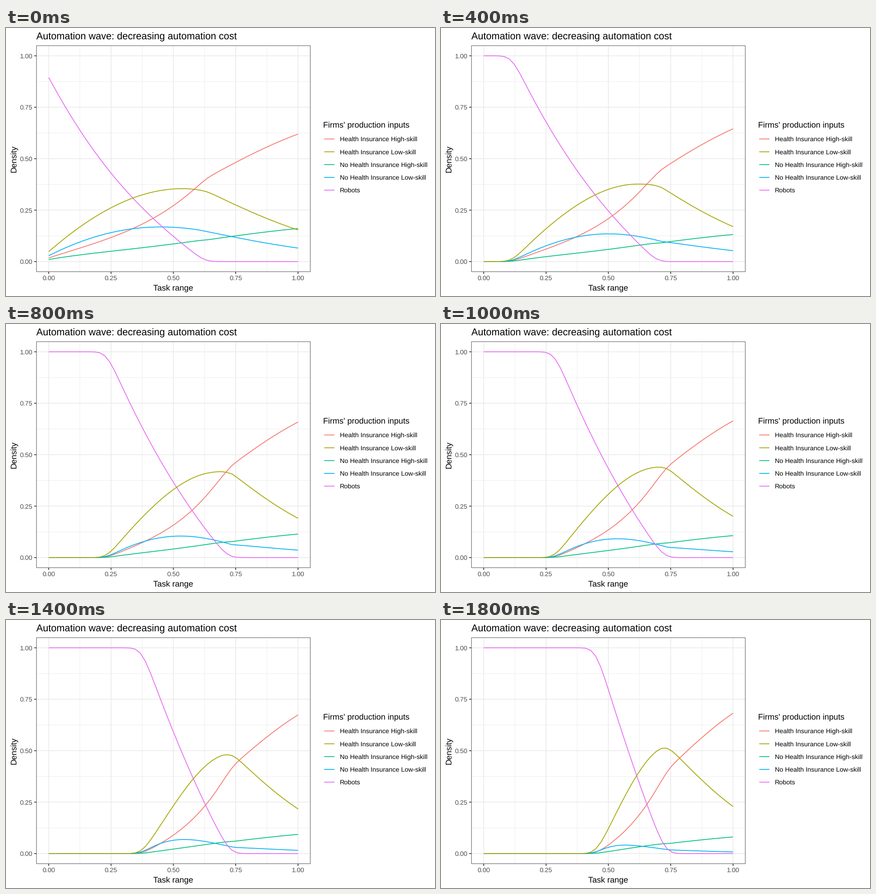
Write a matplotlib script that moves like this. It is 947 px wide and 592 px high and loops after 2000 ms.

```python
import numpy as np
import matplotlib.pyplot as plt
from matplotlib.animation import FuncAnimation
from matplotlib.patches import Rectangle

W, H = 947, 592
DPI = 100
FRAMES, INTERVAL = 10, 200
PT = 72 / DPI                 # one pixel in points
SMALL, MEDIUM, LARGE = 14.36, 17.95, 21.6
LINE = 1.74
LEFT, RIGHT, TOP, BOTTOM = 66.8, 672.2, 38.6, 538.7

plt.rcParams["font.family"] = "Liberation Sans"
plt.rcParams["text.hinting"] = "none"

SERIES = [
    ("Health Insurance High-skill", "#F8766D"),
    ("Health Insurance Low-skill", "#A3A500"),
    ("No Health Insurance High-skill", "#00BF7D"),
    ("No Health Insurance Low-skill", "#00B0F6"),
    ("Robots", "#E76BF3"),
]

tasks = np.linspace(0, 1, 50)
noise = np.linspace(-3, 3, 41)
weights = np.exp(-noise ** 2 / 2)
weights /= weights.sum()


def px(x):
    return 94.3 + 550.4 * np.asarray(x)


def py(y):
    return 516.0 - 454.6 * np.asarray(y)


def logistic(z):
    return 1 / (1 + np.exp(-z))


def robot_range(step):
    """Tasks where robots stop being the only input, and where they vanish."""
    first = -0.045 + 0.527 * np.log1p(step / 5.8)
    last = 0.732 - 0.105 * np.exp(-step / 1.85)
    return first, last


def robot_share(step, t):
    """Falls from 1 to 0 over the range, with both corners softened."""
    first, last = robot_range(step)
    u = (last - tasks[:, None] - 0.025 * noise) / (last - first)
    u = np.clip(u, 0, 1)
    linear = 0.625 + 0.18 * t
    return (linear * u + (1 - linear) * u ** (2.7 - 0.95 * t)) @ weights


def skilled_share(t):
    """High-skilled part of the workers."""
    bend_at = 0.595 + 0.14 * t ** 1.5
    bend = 3.0 + 7.4 * t - 5.0 * t ** 2
    slope = 3.34 + 2.1 * t - 0.35 * t ** 2
    odds = 1.27 - 0.1 * t - slope * (1 - tasks)
    return logistic(odds + bend * np.maximum(bend_at - tasks, 0) ** 2)


def insured_shares(t, edge):
    """Insured part of the high-skilled and of the low-skilled."""
    before = np.maximum(edge - tasks, 0)
    after = np.maximum(tasks - edge, 0) / (1 - edge)
    high = 0.794 + 0.1 * t ** 0.67 - (0.24 + 0.11 * t ** 2) * before

    fall = 0.8 + 7.2 * np.sin(np.pi * t / 2) ** 1.5
    drop = fall * before / (1 + 1.15 * (1 - t) ** 1.5 * fall * before)
    odds = 0.85 + 2.5 * t ** 1.38 + 0.8 * t * (1 - t) * (1 - after)
    return high, logistic(odds - drop)


def densities(step):
    t = step / (FRAMES - 1)
    robots = robot_share(step, t)
    skilled = (1 - robots) * skilled_share(t)
    unskilled = 1 - robots - skilled
    high, low = insured_shares(t, robot_range(step)[1] + 0.015)
    return (skilled * high, unskilled * low,
            skilled * (1 - high), unskilled * (1 - low), robots)


fig = plt.figure(figsize=(W / DPI, H / DPI), dpi=DPI, facecolor="white")
ax = fig.add_axes([0, 0, 1, 1])
ax.set_xlim(0, W)
ax.set_ylim(H, 0)
ax.axis("off")


def segment(x0, y0, x1, y1, color, width=LINE, z=1):
    ax.plot([x0, x1], [y0, y1], color=color, lw=width * PT, zorder=z,
            solid_capstyle="butt", snap=False)


def label(x, y, text, size, color="black", ha="left", **kw):
    ax.text(x, y, text, fontsize=size * PT, color=color, ha=ha,
            va="baseline", **kw)


def draw_panel():
    for v in np.arange(0.125, 1, 0.25):
        segment(px(v), TOP, px(v), BOTTOM, "#EBEBEB", LINE / 2)
        segment(LEFT, py(v), RIGHT, py(v), "#EBEBEB", LINE / 2)
    for v in np.linspace(0, 1, 5):
        segment(px(v), TOP, px(v), BOTTOM, "#EBEBEB", z=2)
        segment(LEFT, py(v), RIGHT, py(v), "#EBEBEB", z=2)
        segment(px(v), BOTTOM, px(v), BOTTOM + 4.5, "#333333")
        segment(LEFT - 4.5, py(v), LEFT, py(v), "#333333")
        label(px(v), 557.3, f"{v:.2f}", SMALL, "#4D4D4D", "center")
        label(58.7, py(v) + 5.1, f"{v:.2f}", SMALL, "#4D4D4D", "right")
    inset = LINE / 4
    ax.add_patch(Rectangle((LEFT + inset, TOP + inset),
                           RIGHT - LEFT - 2 * inset, BOTTOM - TOP - 2 * inset,
                           fill=False, ec="#333333", lw=LINE / 2 * PT,
                           zorder=5, snap=False))


def draw_text():
    label(LEFT, 25, "Automation wave: decreasing automation cost", LARGE)
    label((LEFT + RIGHT) / 2, 579.1, "Task range", MEDIUM, ha="center")
    label(21.3, (TOP + BOTTOM) / 2, "Density", MEDIUM, ha="center",
          rotation=90, rotation_mode="anchor")
    label(699.6, 219.7, "Firms' production inputs", MEDIUM)
    for i, (name, color) in enumerate(SERIES):
        y = 245.2 + 28.25 * i
        segment(702.4, y, 725, y, color)
        label(736.8, y + 5.1, name, SMALL)


draw_panel()
draw_text()

# The insured low-skill curve lies on top where the curves meet at zero.
curves = [ax.plot([], [], color=color, lw=LINE * PT, solid_capstyle="butt",
                  solid_joinstyle="round", snap=False,
                  zorder=4 if i == 1 else 3)[0]
          for i, (_, color) in enumerate(SERIES)]


def update(step):
    for curve, values in zip(curves, densities(step)):
        curve.set_data(px(tasks), py(values))
    return curves


anim = FuncAnimation(fig, update, frames=FRAMES, interval=INTERVAL,
                     init_func=lambda: update(0), repeat=True, repeat_delay=0)
plt.show()
```
